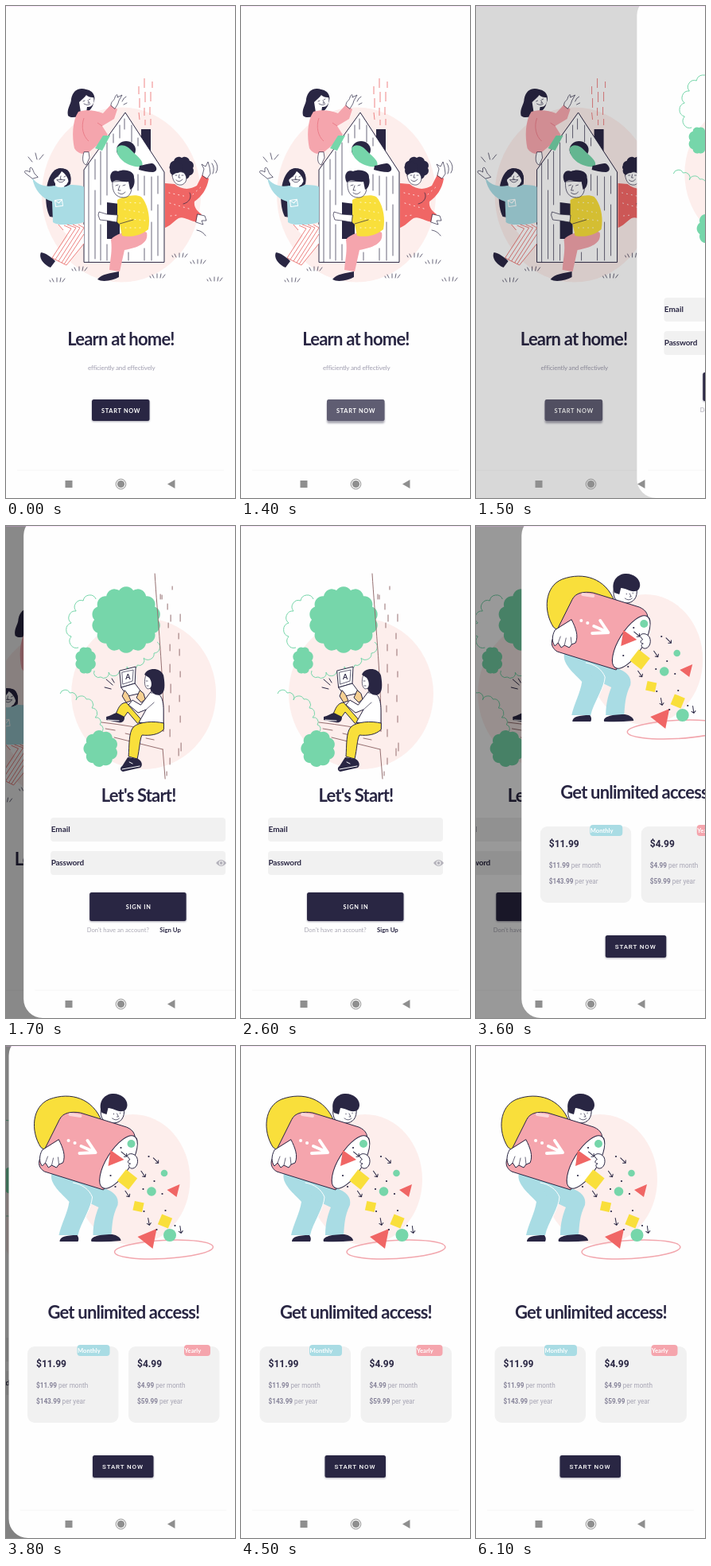
These frames come from a looping animation (288x619 px, 6.2 s). An HTML page:

```html
<!DOCTYPE html>
<html lang="en">
<head>
<meta charset="utf-8">
<title>Onboarding screens</title>
<style>
  html, body { margin: 0; width: 100%; height: 100%; overflow: hidden; background: #fefefe; }
  svg { display: block; width: 288px; height: 619px; }
  text { font-family: Lato, sans-serif; fill: #292643; }
  .title { font-size: 22px; font-weight: 700; letter-spacing: -.8px; text-anchor: middle; }
  .bold { font-weight: 700; }
  .label { font-size: 7.4px; font-weight: 700; letter-spacing: .7px; fill: #fff; }
  .roboto text { font-family: Roboto, sans-serif; }
  .white { fill: #fff; }
  .dark { fill: #292643; }
  .pale { fill: #fdeeec; }
  .pink { fill: #f5a5ad; }
  .yellow { fill: #f9df3b; }
  .green { fill: #76d6aa; }
  .blue { fill: #a9dce4; }
  .red { fill: #f06665; }
  .skin { fill: #f6cf91; }
  .gray { fill: #b3b1ba; }
  .soft { fill: #f1f1f1; }
  .line { fill: none; }
  .ink { stroke: #292643; stroke-width: 1; stroke-linecap: round; stroke-linejoin: round; }
  .thin { stroke-width: .7; }
  .chalk { fill: none; stroke: #fff; stroke-linecap: round; stroke-linejoin: round; }
  .dashed { stroke-width: .8; stroke-dasharray: 1 5; }
  .wide { stroke-width: 4; }
  .curl { fill: none; stroke: #76d6aa; stroke-width: 1; }
  .bark { fill: none; stroke: #956f70; stroke-width: 1; stroke-linecap: round; }
  .smoke { fill: none; stroke: #ef8586; }
  .fold { fill: none; stroke: #e87480; stroke-width: .8; }
  .stripes { fill: none; stroke: #ea7270; stroke-width: .9; }
  .ring { fill: none; stroke: #f2a6ad; stroke-width: 1.5; }
</style>
</head>
<body>
<svg id="stage" viewBox="0 0 288 619"></svg>
<script>
const LOOP = 6200, WIDTH = 288;

const path = (cls, d) => `<path class="${cls}" d="${d}"/>`;
const oval = (cls, x, y, rx, ry = rx, turn = 0) =>
  `<ellipse class="${cls}" cx="${x}" cy="${y}" rx="${rx}" ry="${ry}" transform="rotate(${turn} ${x} ${y})"/>`;
const box = (cls, x, y, w, h, r = 0, turn = 0) =>
  `<rect class="${cls}" x="${x}" y="${y}" width="${w}" height="${h}" rx="${r}" transform="rotate(${turn} ${x + w / 2} ${y + h / 2})"/>`;
const text = (x, y, str, cls = '', style = '') =>
  `<text x="${x}" y="${y}" class="${cls}" style="${style}">${str}</text>`;

// Chain of small arcs through points, used for leaves and curly hair.
const scallop = (points, bulge = .55, sweep = 1) => points.map(([x, y], i) => {
  if (!i) return `M${x} ${y}`;
  const r = Math.hypot(x - points[i - 1][0], y - points[i - 1][1]) * bulge;
  return `A${r} ${r} 0 0 ${sweep} ${x} ${y}`;
}).join('');
const cloud = (cls, cx, cy, rx, ry, n) => path(cls, scallop(Array.from({ length: n + 1 }, (_, i) => {
  const a = i / n * 2 * Math.PI;
  return [cx + rx * Math.cos(a), cy + ry * Math.sin(a)];
}), .6) + 'Z');

const grass = (x, y) => path('ink line thin',
  `M${x - 9} ${y}l-1-2M${x - 5} ${y}l-2-4M${x - 1} ${y}v-5M${x + 3} ${y}l1-5M${x + 6} ${y}l3-4`);

const button = (x, y, w, h, label) => `
  <rect class="shadow" x="${x}" y="${y + 1}" width="${w}" height="${h}" rx="2.5" fill="#292643" opacity=".4" filter="url(#blur)"/>
  ${box('dark', x, y, w, h, 2.5)}
  <rect class="press" x="${x}" y="${y}" width="${w}" height="${h}" rx="2.5" fill="#fff" opacity="0"/>${label}`;

const topGirl = `
  ${path('dark', 'M78 138C76 129 82 124 82 117C84 105 93 102 101 105C112 107 113 117 110 122C109 129 104 132 101 134L94 141C90 137 84 143 78 138Z')}
  ${path('white', 'M92 121C95 118 99 115 101 112C104 115 108 115 110 115C112 122 108 128 102 127L101 134H94Z')}
  ${path('ink line thin', 'M97 120l2-1M104 118l2-1M103 119l2 3h-2M98 123q5 3 8 0')}
  ${path('pink', 'M91 133C83 145 83 165 86 179C91 187 99 187 104 184L115 175L128 162L121 151L136 142L140 130L132 124L122 135C113 131 100 130 91 133Z')}
  ${path('green', 'M112 179L122 163L131 163L121 182Z')}
  ${path('fold', 'M98 141C94 152 97 164 104 170M121 151L115 147')}
  ${path('white ink thin', 'M132 125C132 119 136 120 137 115C139 110 141 111 140 115L146 112L142 119C141 124 138 127 137 129Z')}
  ${path('ink line thin', 'M146 120q2-5 5-6M148 124l4-2')}
  ${path('white ink thin', 'M98 184C95 193 97 199 101 200L105 191L104 184Z')}`;

const leftGirl = `
  ${path('dark', 'M55 265C46 248 49 206 68 204C80 204 84 215 80 225L61 266Z')}
  ${oval('white', 69.5, 217, 9.5, 10.5)}
  ${path('white', 'M62 221H73V230H62Z')}
  ${path('dark', 'M57 222C56 206 66 203 70 205C79 203 83 212 81 225C78 221 79 214 70 208C67 214 62 216 57 222Z')}
  ${path('ink line thin', 'M64 215l2-1M73 215l2-1M69 214l-1 4h2M64 219q5 6 10 0z')}
  ${path('blue', 'M33 216C40 226 50 228 61 226Q70 231 80 225C90 225 98 226 98 228V272C85 276 65 277 59 272L58 246C45 242 36 232 33 216Z')}
  <g transform="rotate(-8 66 248)">${path('chalk', 'M62 244H71V252H62ZL66.500 248L71 244')}</g>
  ${path('white ink thin', 'M33 217L24 210C22 206 27 207 30 209L30 204C33 201 34 208 36 211L40 215Z')}
  ${path('ink line thin', 'M28 190l5 6M37 185l2 8M47 187l-5 6')}
  ${path('white', 'M66 275H98V299L76 326L58 317L78 290Z')}
  ${path('stripes', 'M66 275L72 282M73 276L82 280L58 317M77 275L88 279L62 319M84 275L93 279L66 321M91 275L98 279L70 323M98 287L73 325M98 299L76 326M58 317L76 326')}
  ${path('dark', 'M44 310C50 311 56 315 62 321L56 329C50 327 40 318 44 310Z')}`;

const rightMan = `
  ${cloud('dark', 221, 204, 14, 13, 8)}
  ${path('white ink thin', 'M209 213C212 210 219 207 224 210C229 216 227 223 221 225C214 226 210 221 209 213Z')}
  ${cloud('dark', 214, 203, 8, 6, 7)}
  ${path('ink line thin', 'M213 213h2M221 213h2M218 212l-1 4h2M214 219q4 4 8-1')}
  ${path('red', 'M200 223L212 224C222 232 232 231 240 226L247 212L255 217C253 230 246 240 237 246C236 253 240 258 246 262L240 272C230 270 223 264 217 267C211 271 206 277 200 279Z')}
  ${path('chalk dashed', 'M205 235L228 240M206 248L230 255M207 264L216 263M235 237L247 226')}
  ${path('ink line thin', 'M231 235C234 240 231 247 223 249')}
  ${path('white ink thin', 'M247 213L249 205L246 199L251 202L254 196L256 203L257 211L253 217Z')}
  ${path('white ink thin', 'M241 262L250 264L252 270L246 270L248 275L239 272Z')}
  ${path('ink line thin', 'M259 198q4 6 1 13M262 194q7 8 2 16M240 282q7 1 11 7')}`;

const centerMan = `
  ${path('dark', 'M127 247L143 249V293H127Z')}
  ${path('pink', 'M132 294C138 285 165 279 177 285C180 299 165 304 149 307L143 334L130 332C131 318 134 309 132 294Z')}
  ${path('yellow', 'M140 244C147 240 162 236 170 240C178 248 182 266 179 281C168 290 155 291 146 289L143 275L139 271L140 261Z')}
  ${path('chalk dashed', 'M150 247L170 248M149 256L173 260M150 267L175 270M150 279L173 279')}
  ${path('white ink thin', 'M134 221L157 220C160 232 156 241 148 241C138 241 133 234 134 221Z')}
  ${path('dark', 'M133 222C128 212 134 205 141 208C150 204 162 208 161 216C163 223 160 230 156 231L154 221C147 223 140 216 133 222Z')}
  ${path('ink line thin', 'M138 226l3-1M147 226l3-1M143 226l-2 6h3M141 235q5 4 9-1M143 274L160 269')}
  ${path('white ink thin', 'M140 263L127 262L117 259L116 263L118 269L127 270L139 272Z')}
  ${path('dark', 'M115 344C120 337 132 336 142 334V341C135 345 122 348 115 344Z')}`;

const welcome = `
  ${oval('pale', 145, 237.5, 100, 110)}
  ${path('smoke', 'M167 101v10M174 91v12M184 95v8M168 116v12M175 108v13M182 108v12M167 134l1 9M174 128v10M181 127v10M175 143v7M182 142v8')}
  ${box('dark', 170, 155, 12, 32)}
  ${path('white ink', 'M98 322V206L150 134L199 209V322Z')}
  ${path('ink line thin', 'M104 322V198M112 193V218M112 232V318M119 183V250M119 275V320M127 172V238M127 300V320M135 161V172M143 150V166M149 142V155M158 150V171M166 166V176M166 212V232M174 214V238M183 215V257M183 272V320M191 214V236M191 250V314M174 305V320M154 310V320')}
  ${oval('dark', 151, 181, 12, 11)}
  ${path('green', 'M139 179C143 172 153 175 160 184C166 190 174 195 171 202C160 204 139 196 139 179Z')}
  ${path('dark', 'M168 201C175 200 183 196 186 199C191 204 190 208 185 209C178 209 172 207 167 206Z')}
  ${topGirl}${leftGirl}${rightMan}${centerMan}
  ${[[65, 347], [93, 333], [191, 342], [219, 316], [242, 324], [263, 346]].map(p => grass(...p)).join('')}
  ${text(144.5, 427, 'Learn at home!', 'title')}
  ${text(103, 458, 'efficiently and effectively', '', 'font-size:8px;letter-spacing:-.15px;fill:#a09eb0')}
  ${button(108, 495, 72.5, 27, text(120, 511.5, 'START NOW', 'label'))}`;

const reader = `
  ${path('yellow ink', 'M150 246L129 222C120 223 119 231 116 236L126 241L131 234L143 248Z')}
  ${path('dark', 'M104 240C109 239 113 236 117 235L127 240C127 246 124 248 119 247L104 244Z')}
  ${path('white ink', 'M160 209C170 208 176 214 176 232V248C165 250 152 248 145 247L154 231L144 235L132 225L137 219L147 225Z')}
  ${path('ink line thin', 'M154 231L164 222')}
  ${path('yellow ink', 'M176 248C164 245 145 246 138 253C132 260 133 276 132 290L143 293C146 280 146 268 149 263C158 264 170 263 176 256Z')}
  ${path('dark', 'M131 291L144 293C149 296 150 301 147 304L125 309C121 308 121 304 124 302Z')}
  ${path('chalk', 'M106 244L120 245M124 306L146 302M133 297l4 2')}
  ${path('white ink thin', 'M154 187C151 195 152 203 156 205L161 204L160 210L167 210L164 192Z')}
  ${path('dark', 'M152 187C155 178 172 177 176 188C177 194 179 207 174 211C170 215 161 212 159 204C162 201 161 195 158 191Z')}
  ${path('ink line thin', 'M154 195h2M155 201h2')}
  ${path('white ink', 'M121 182L141 177L140 198L123 203Z')}
  ${path('ink line thin', 'M124 184L138 181L137 195L125 199Z')}
  ${path('white ink', 'M123 203L140 198L149 210L131 214Z')}
  ${path('skin ink', 'M127 207L124 214L129 222L135 220L132 213ZM146 207L142 216L148 222L153 218L151 211Z')}
  ${text(128, 193, 'A', 'bold', 'font-size:9px')}
  ${path('ink line', 'M104 193L112 200M102 203L110 205M111 192L114 197')}`;

const login = `
  ${oval('pale', 151, 211, 91, 95)}
  ${cloud('green', 129, 118, 40, 38, 14)}
  ${cloud('green', 78, 169, 11, 16, 8)}
  ${cloud('green', 97, 280, 19, 21, 9)}
  ${path('curl', scallop([[91, 92], [75, 94], [66, 107], [60, 122], [60, 139], [69, 153]], .52, 0))}
  ${path('curl', scallop([[168, 146], [164, 160], [151, 166], [143, 175], [130, 177], [120, 184], [107, 184], [97, 190], [89, 182]], .53))}
  ${path('curl', scallop([[46, 211], [58, 210], [66, 219], [79, 218], [86, 229], [90, 241], [96, 250], [97, 260]], .53))}
  ${path('bark', 'M165 60C168 110 176 190 176 247V258M175 281L178 318M98 247C125 250 150 255 176 258M114 266L175 281')}
  ${path('bark', 'M172 86v6M174 87v5M181 98v7M187 80v-4M185 112v8M197 111v9M182 122v6M195 135v7M184 149v8M196 155v8M184 174v10M197 183v7M185 199v11M196 213v8M183 226v8M197 239v8M184 256v9M198 273v10M195 280v9M184 292v8M180 309v5M103 255l12 2M128 261l13 3M154 267l10 2M137 269l8 2')}
  ${reader}
  ${text(144.5, 347, 'Let\'s Start!', 'title')}
  ${box('soft', 34, 367, 220, 30, 4)}${box('soft', 34, 409, 220, 30, 4)}
  ${text(34.5, 385, 'Email', 'bold', 'font-size:10px')}
  ${text(34.5, 427, 'Password', 'bold', 'font-size:10px;letter-spacing:-.2px')}
  ${path('gray', 'M242 424Q248.500 416 255 424Q248.500 432 242 424Z')}
  ${oval('soft', 248.5, 424, 3)}${oval('gray', 248.5, 424, 1.9)}
  ${button(83, 461, 121.5, 36, text(128.5, 482, 'SIGN IN', 'label'))}
  ${text(79.5, 511, 'Don\'t have an account?', '', 'font-size:7.65px;fill:#aaa8b4')}
  ${text(171, 511, 'Sign Up', 'bold', 'font-size:7.8px')}`;

const priceCard = (x, badge, badgeX, badgeWidth, color, monthly, yearly) => {
  const row = (y, price, unit) => `<text x="${x + 11}" y="${y}" style="font-size:8.2px;fill:#a7a5b4">` +
    `<tspan class="bold" fill="#87849a">${price}</tspan> per ${unit}</text>`;
  return `${box('soft', x, 378, 114.5, 96, 9)}${box(color, badgeX, 376, badgeWidth, 14, 4)}
    ${text(badgeX + .5, 386, badge, '', 'font:700 7.6px Lato,sans-serif;fill:#fff')}
    ${text(x + 11, 404, monthly, 'bold', 'font-size:12px')}
    ${row(430, monthly, 'month')}${row(450, yearly, 'year')}`;
};

const arrow = (x, y, turn) => `<g transform="translate(${x} ${y}) rotate(${turn})">${path('ink line', 'M0-4.500V4.500M-2.500 2L0 4.500L2.500 2')}</g>`;

const carrier = `
  ${path('blue', 'M54 160C50 173 67 186 76 196C74 210 66 224 63 238H87C90 222 104 206 105 190L92 168Z')}
  ${path('blue', 'M80 168L120 179C132 183 139 190 137 200C130 214 130 226 129 238H106C106 222 110 210 113 203L90 192Z')}
  ${path('chalk', 'M81 172C92 174 101 180 105 190C104 204 94 216 90 234')}
  ${path('dark', 'M64 246C64 240 72 238 86 238Q89 242 87 246ZM104 246C102 241 110 237 130 237C136 238 141 241 141 245Q122 247 104 246Z')}
  ${path('yellow ink', 'M40 127C27 107 29 76 51 67C78 57 106 66 117 95L95 94L66 90L46 131Z')}
  ${path('white ink', 'M116 79C114 91 120 98 131 97C141 97 146 90 145 79L132 73Z')}
  ${path('dark', 'M117 84C112 73 118 61 130 60C140 59 149 66 149 74C149 79 146 82 143 82C136 83 131 78 125 78L123 86Z')}
  ${path('ink line thin', 'M132 85v1M140 84v1M136 85l2 4h-2M130 91q5 4 9 0')}
  ${path('pink ink', 'M64 92C68 84 78 82 90 84L148 102C158 106 161 114 157 123L119 181L45 158C38 154 36 147 40 140Z')}
  <g opacity=".55">${path('chalk wide', 'M77 86L90 88')}</g>
  ${oval('white ink', 138, 146, 15, 38, 32)}
  ${path('chalk wide', 'M75 119h.1M83 122h.1M91 126L107 133M99 119L109 134L89 135')}
  ${path('white ink', 'M42 131C38 138 38 146 42 151L46 147L50 153L54 150L60 153L63 149L68 147C72 138 68 128 63 118Z')}
  ${path('ink line thin', 'M49 139L46 147M56 141L54 150M62 140L63 149')}`;

const pricing = `
  ${oval('pale', 156, 168, 72, 82)}
  ${oval('ring', 195, 256, 62, 11.5, -3)}
  ${carrier}
  ${[[154, 123, 5], [195.5, 160, 4.3], [179.5, 183, 5.8], [202.5, 238, 8]].map(dot => oval('green', ...dot)).join('')}
  ${box('yellow', 140, 159, 18, 18, 0, 38)}${box('yellow', 157, 196, 12, 12, 0, 12)}${box('yellow', 189.5, 213.5, 14, 14, 0, 22)}
  ${path('red', 'M128 131L145 143L125 151ZM199 181L215 174L211 190ZM162 240L186 230L181 255Z')}
  ${path('white ink', 'M149 138C151 134 158 135 161 140C164 147 160 155 154 154C150 152 150 149 153 148C149 148 149 144 152 143Z')}
  ${[[145, 136, -50], [169, 161, -35], [185, 144, -45], [149, 186, -35], [176, 221, -10], [216, 231, -8]].map(a => arrow(...a)).join('')}
  ${[[141, 128], [128, 163], [176, 139], [169, 180], [183, 170], [193, 186], [170, 208], [197, 207], [186, 231], [209, 226], [134, 177]].map(([x, y]) => oval('dark', x, y, 1.1)).join('')}
  ${text(144.5, 343, 'Get unlimited access!', 'title')}
  <g class="roboto">
    ${priceCard(23.5, 'Monthly', 86, 41, 'blue', '$11.99', '$143.99')}
    ${priceCard(150.5, 'Yearly', 220.5, 33, 'pink', '$4.99', '$59.99')}
    ${button(105.5, 515, 76.5, 28, text(117.5, 532, 'START NOW', 'label', 'font-size:8px;font-weight:500;letter-spacing:.85px'))}
  </g>`;
const stage = document.getElementById('stage');
stage.innerHTML = `
  <defs><filter id="blur" x="-20%" y="-40%" width="140%" height="190%"><feGaussianBlur stdDeviation="1.2"/></filter></defs>
  ${[welcome, login, pricing].map(content => `<g class="page">
    <rect class="sheet" y="-12" width="320" height="631" fill="#fefefe"/>
    <path d="M14 584H274" stroke="#f6f6f6"/>${content.replaceAll('class="title"', 'class="title"')}
    <rect class="dim" y="-12" width="400" height="640" opacity="0"/></g>`).join('')}
  <rect width="288" height="1" fill="#f0a0f5" opacity=".25"/>
  <g fill="#8f8f8f"><rect x="74.5" y="597" width="9" height="9"/><circle cx="144.5" cy="601.5" r="4.6"/>
    <circle cx="144.5" cy="601.5" r="6.3" fill="none" stroke="#8f8f8f"/><path d="M203 601.5L212.5 596V607Z"/></g>`;

const all = selector => [...stage.querySelectorAll(selector)];
const pages = all('.page'), sheets = all('.sheet'), dims = all('.dim');
const presses = all('.press'), shadows = all('.shadow');

// Damped spring from 0 to 1.
function spring(p) {
  if (p <= 0) return 0;
  if (p >= 1) return 1;
  const decay = 7.46, freq = 2.45;
  return 1 - Math.exp(-decay * p) * (Math.cos(freq * p) + decay / freq * Math.sin(freq * p));
}

const slide = (t, start) => spring((t - start) / 550);
const tap = (t, start) => Math.max(0, Math.min(.25, (t - start) / 800, (start + 500 - t) / 800));

function draw(t) {
  const entered = [1, slide(t, 1425), slide(t, 3400), 0];
  pages.forEach((page, i) => {
    const offset = WIDTH * (1 - entered[i]);
    const covered = entered[i + 1];
    page.setAttribute('transform', `translate(${offset - WIDTH * .25 * covered} 0)`);
    page.setAttribute('visibility', entered[i] > 0 && covered < 1 ? 'visible' : 'hidden');
    sheets[i].setAttribute('rx', offset > .4 ? 24 : 0);
    dims[i].setAttribute('opacity', covered * .5);
  });
  [1200, 3100].forEach((start, i) => {
    const amount = tap(t, start);
    presses[i].setAttribute('opacity', amount);
    shadows[i].setAttribute('y', Number(presses[i].getAttribute('y')) + 1 + amount * 8);
  });
}

// The motion advances in tenths of a second.
function tick() {
  draw(Math.floor(performance.now() % LOOP / 100) * 100);
  requestAnimationFrame(tick);
}
tick();
</script>
</body>
</html>
```
